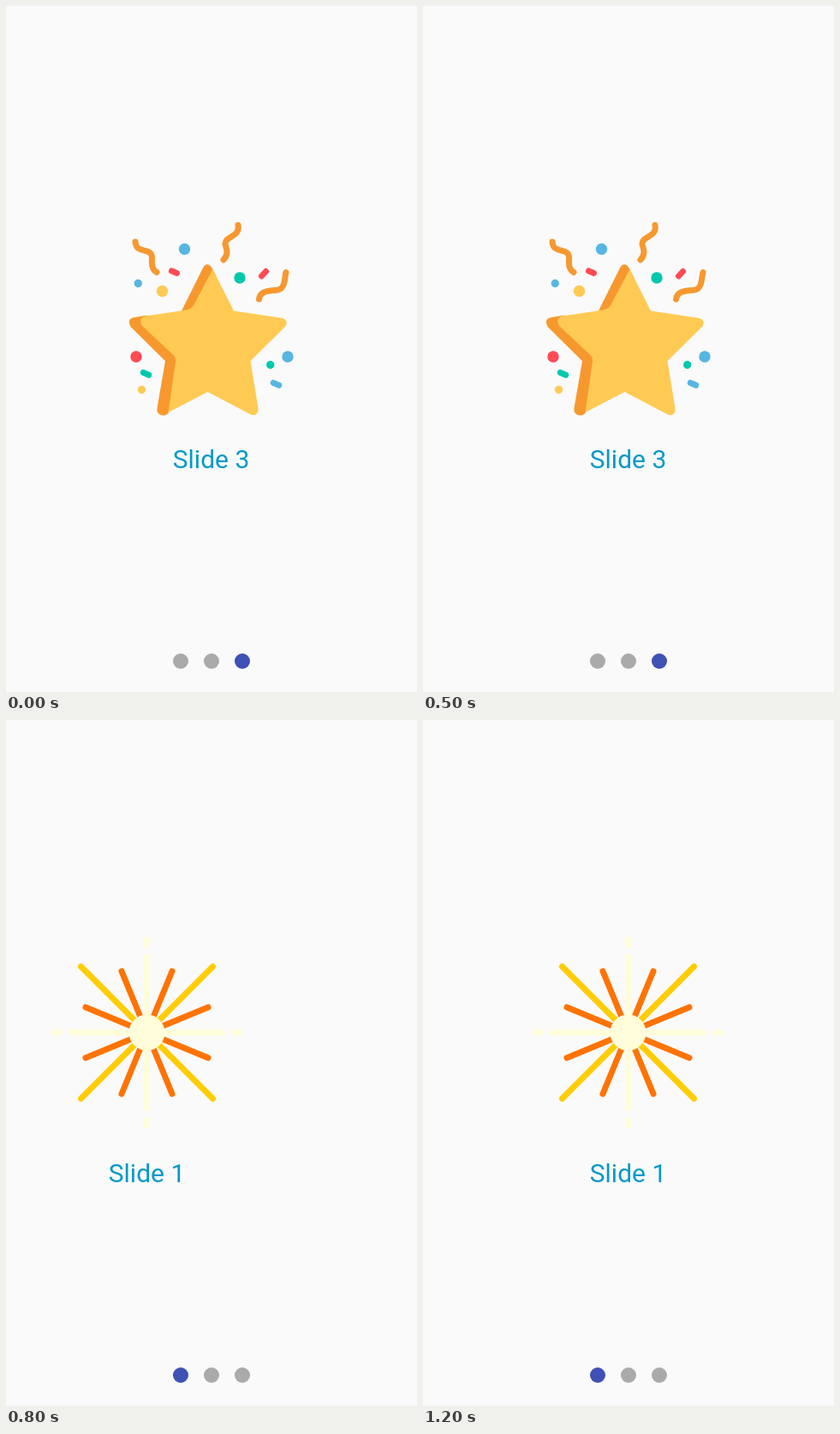
Animation of 480x800 px, one loop 5 s. Source, as an HTML page:

```html
<!DOCTYPE html>
<html>
<head>
<meta charset="utf-8">
<style>
html, body { margin: 0; width: 100%; height: 100%; overflow: hidden; background: #fafafa }
svg { display: block; width: 100%; height: 100% }
text { font: 30px Roboto, sans-serif; fill: #0599c8; text-anchor: middle }
.line { fill: none; stroke-width: 7; stroke-linecap: round; stroke-linejoin: round }
</style>
</head>
<body>
<svg viewBox="0 0 480 800">
  <g class="slide">
    <g id="rays" class="line" transform="translate(239.5 364.5)"></g>
    <circle cx="239.5" cy="364.5" r="21" fill="#fffdd9"/>
    <text x="239.5" y="539">Slide 1</text>
  </g>

  <g class="slide">
    <g transform="translate(97 0)">
      <path fill="#636b91" d="M74 385H175V465Q175 477 163 477H86Q74 477 74 465Z"/>
      <path fill="#e0673f" d="M74 390H175V414H74Z"/>
      <path fill="#54597c" d="M74 414H175V417H74Z"/>
      <rect x="47" y="364.5" width="155" height="31" rx="15.5" fill="#636b91"/>
      <path fill="#b0b1b3" d="M78 376H175V384H78Z"/>
      <path fill="#ecebe9" d="M94 326V290C94 272 99 260 105 253C111 260 117 272 117 290V318H133V290C133 272 138 260 144 253C150 260 155.500 272 155.500 290V326C161 330 163 336 163 344V380H90V344C90 336 91 331 94 326Z"/>
      <g class="line">
        <path stroke="#ff5f69" stroke-width="8" d="M105.300 279V306"/>
        <path stroke="#b98598" stroke-width="8" d="M144 279V306"/>
        <path stroke="#67636d" stroke-width="8" d="M109 341V349M140 341V349"/>
        <path stroke="#c08092" d="M125 361L113 369"/>
        <path stroke="#fa626b" d="M125 352V361L136 369"/>
      </g>
      <path fill="#686472" d="M195 292L207.500 284L253.500 355.500L241 363.500Z"/>
      <path fill="#f7b53a" d="M182 271.500L195.500 264L208 284L195 292ZM43 271h8v8h-8zM31 283h8v8h-8zM55 283h8v8h-8zM43 294.500h8v8h-8zM210 403h8v8h-8zM202 411h8v8h-8zM218 411h8v8h-8zM210 419h8v8h-8z"/>
    </g>
    <text x="239.5" y="539">Slide 2</text>
  </g>

  <g class="slide">
    <path fill="#f7982f" d="M205 355.500L230.500 304.500Q235 298 240 304.500L246 316L200 412L190 474Q187 478.500 181 477Q175.500 475 176.500 469L186 414L145.500 374Q141 366 148 363.500L162 361L215 360Z"/>
    <path fill="#ffca54" d="M241.500 307L266 355.500L323 364Q330 366.500 326.500 373.500L285.500 414L294.500 469Q295 479 286 476.500L235.500 450L189.500 474L198 415Q198.500 410 195.500 407L159 373Q155 366 160.500 362L207 355Q216 354 218.500 350Z"/>
    <g class="line">
      <path stroke="#f7982f" d="M151 275C152 291 172 279 170.500 296C170 303 171 308 176 310.500M271 255.500C274 270 255 268 256 278C258 284 260 290 254 296M327 310.500C325 317 327 331 315 331.500C305 332 297 333 295.500 342"/>
      <path stroke="#ff4b55" d="M193.500 309L199.500 311.500M298.500 315L303.500 309.500"/>
      <path stroke="#00c8ae" d="M160.300 427.500L166.700 430.300"/>
      <path stroke="#56b6e1" d="M312.300 439.500L318.700 442.300"/>
    </g>
    <g fill="#56b6e1">
      <circle cx="208.5" cy="283.5" r="6.7"/>
      <circle cx="154.3" cy="323.5" r="4.7"/>
      <circle cx="329" cy="409" r="6.7"/>
    </g>
    <g fill="#ffca54">
      <circle cx="182.5" cy="332.5" r="6.7"/>
      <circle cx="158.5" cy="447.5" r="4.7"/>
    </g>
    <g fill="#00c8ae">
      <circle cx="273" cy="317" r="6.7"/>
      <circle cx="308.7" cy="418.5" r="4.7"/>
    </g>
    <circle cx="152" cy="409" r="6.7" fill="#ff4b55"/>
    <text x="239.5" y="539">Slide 3</text>
  </g>

  <g id="dots">
    <circle cx="204" cy="764" r="9"/>
    <circle cx="240" cy="764" r="9"/>
    <circle cx="276" cy="764" r="9"/>
  </g>
</svg>
<script>
const slides = document.querySelectorAll('.slide');
const dots = document.querySelectorAll('#dots circle');

// One quarter of the burst, turned four times
const quarter = `
  <path stroke="#ffcd05" d="M0 0L77-77"/>
  <path stroke="#ff7302" d="M0 0L71.500-29.500M0 0L29.500-71.500"/>
  <path stroke="#fffdd9" d="M0 0H88M102 0H108.500"/>`;
document.getElementById('rays').innerHTML =
  [0, 90, 180, 270].map(a => `<g transform="rotate(${a})">${quarter}</g>`).join('');

// The pager flings back in hard steps: start time, slide, offset, active dot
const steps = [
  [0, 2, 0, 2],
  [700, 1, -97, 0],
  [800, 0, -75, 0],
  [900, 0, 0, 0]
];

function draw(now) {
  const t = now % 5000;
  const [, shown, x, active] = steps.findLast(s => t >= s[0]);
  slides.forEach((slide, i) => {
    slide.setAttribute('display', i === shown ? 'inline' : 'none');
    slide.setAttribute('transform', `translate(${x} 0)`);
  });
  dots.forEach((dot, i) => dot.setAttribute('fill', i === active ? '#3f51b5' : '#aaa'));
}

const start = performance.now();
function tick() {
  draw(performance.now() - start);
  requestAnimationFrame(tick);
}
tick();
</script>
</body>
</html>
```
